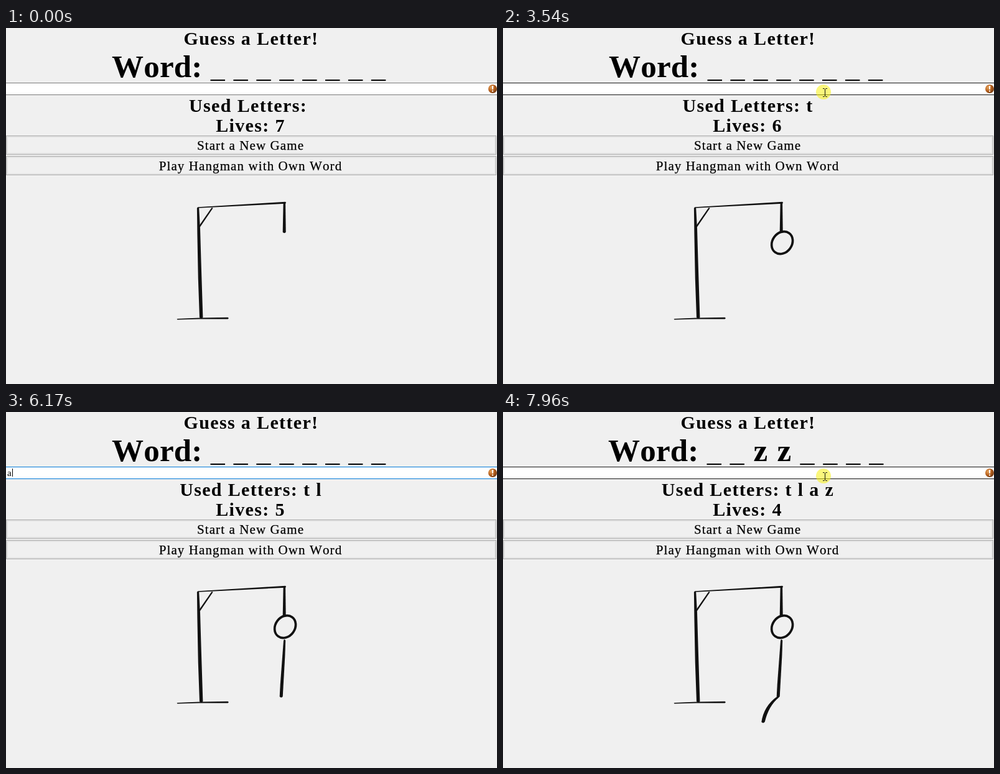
Recreate the animation shown at these times as an HTML page. Size 789 by 573 pixels, loop 8 s.

```html
<!DOCTYPE html>
<html lang="en">
<head>
<meta charset="utf-8">
<title>Hangman</title>
<style>
  html, body { margin: 0; width: 100%; height: 100%; overflow: hidden; background: #f0f0f0; }
  svg { display: block; }
  text {
    font-family: "Liberation Serif", serif;
    font-kerning: none;
    white-space: pre;
    text-anchor: middle;
  }
  .label { font-size: 30px; font-weight: bold; letter-spacing: 1.35px; }
  .word { font-size: 51px; font-weight: bold; letter-spacing: .2px; text-anchor: start; }
  .button { font-size: 21px; letter-spacing: 1.1px; stroke: #000; stroke-width: .25px; }
  .ink { fill: #111; }
</style>
</head>
<body>
<svg width="789" height="573" viewBox="0 0 789 573">
  <defs>
    <radialGradient id="amber" cx=".32" cy=".35" r=".75">
      <stop offset="0" stop-color="#e6a45c"/>
      <stop offset=".5" stop-color="#b9621f"/>
      <stop offset="1" stop-color="#6e3812"/>
    </radialGradient>
    <g id="frame">
      <rect x=".5" y=".5" width="787" height="30" fill="#f0f0f0" stroke="#adadad"/>
      <rect x="2" y="2" width="784" height="27" fill="none" stroke="#e1e1e1" stroke-width="2"/>
    </g>
  </defs>
  <rect width="789" height="573" fill="#f0f0f0"/>

  <text class="label" x="394" y="27">Guess a Letter!</text>
  <g id="word">
    <text class="word" x="170" y="79">Word:</text>
    <path id="blanks" stroke="#000" stroke-width="2"/>
    <g id="found"></g>
  </g>

  <rect y="88" width="789" height="20" fill="#fff"/>
  <rect id="top" y="88" width="789" height="1"/>
  <rect id="bottom" y="107" width="789" height="1"/>
  <text id="typed" x="2" y="103" style="font-size:15px;text-anchor:start"></text>
  <rect id="caret" y="91" width="1" height="13"/>
  <circle cx="782" cy="98" r="7" fill="url(#amber)"/>
  <path d="M780.7 93h2.6l-.5 6h-1.6zM781 100.5h2v2h-2z" fill="#fff"/>

  <text id="used" class="label" x="393.5" y="135"></text>
  <text id="lives" class="label" x="393" y="167"></text>

  <use href="#frame" y="173"/>
  <text class="button" x="393" y="196">Start a New Game</text>
  <use href="#frame" y="206"/>
  <text class="button" x="393" y="229">Play Hangman with Own Word</text>

  <path class="ink" d="M306.9 290q1.6-3.4 3.3 0l1.8 33 1.6 55 2.8 88q-2.5 2.4-5.4 0l-2.2-62-1.4-73z"/>
  <path class="ink" d="M309 288.3l140-8.5q2 1.2 0 2.9l-140 7z"/>
  <path class="ink" d="M330.2 289.6q2.4-.8 2 1l-20.4 30-2.6-.6z"/>
  <path class="ink" d="M445.6 282q1.9-1.6 3.5 0l.6 46.5q-2.4 3.2-5 0z"/>
  <path class="ink" d="M275.5 468.1l36-1.5 45-.9q2.5 1.4 0 2.8l-46 .1-35 .9q-1.8-.7 0-1.4z"/>

  <ellipse class="part" cx="448.6" cy="345.6" rx="15.7" ry="19.1" transform="rotate(36 448.6 345.6)"
    fill="none" stroke="#111" stroke-width="3.7"/>
  <path class="ink part" d="M446 368q1.6-4 3.2 0l-.8 24-3.7 66q-2.4 3-5 0l1-19z"/>
  <path class="ink part" d="M441 457.5q2.5-.2 2 2.2q-16 13-22.3 39q-2.5 3.3-5.4.4q3.7-26 25.7-41.6z"/>

  <circle id="click" cx="515" cy="103" r="12" fill="#f8f010" fill-opacity=".55"/>
  <path id="beam" fill="none" stroke="#111"
    d="M517.5 98v12M514 97.5h2.5M518.5 97.5h2.5M514 110.5h2.5M518.5 110.5h2.5"/>
  <path id="arrow" fill="#fff" stroke="#000" d="M.5.5v16l3.7-3.5 2.5 6 2.6-1.1-2.5-5.8h5z"/>
</svg>
<script>
const LOOP = 8000;
const $ = id => document.getElementById(id);
const GREY = "#7a7a7a", MID = "#484848", DARK = "#171717";
const NAVY = "#07446f", STEEL = "#0364ae", BLUE = "#0078d7";

const start = {
  border: GREY, letters: "", lives: 7, found: false,
  typed: "", caret: false, click: false, beam: false
};
const steps = [[0, {}]];
const add = (time, change) => steps.push([time, change]);

// Pressing on the entry: highlight, then the border fades to blue.
function press(times) {
  const tints = times.length > 3 ? [DARK, NAVY, STEEL, BLUE] : [DARK, STEEL, BLUE];
  times.forEach((time, i) => add(time, { border: tints[i], click: i < times.length - 1 }));
}

// Typing hides the pointer; the answer then redraws the entry under it.
function guess(time, hold, letter, result) {
  add(time, { caret: true, beam: false });
  add(time + 70, { typed: letter });
  add(time + hold, { ...result, typed: "", caret: false, beam: true, border: GREY });
  add(time + hold + 70, { border: MID });
  add(time + hold + 140, { border: DARK });
}

add(790, { border: MID, beam: true });
add(930, { border: DARK });
press([1130, 1200, 1270, 1340]);
guess(2800, 200, "t", { letters: "t", lives: 6 });
press([3540, 3610, 3680, 3750]);
guess(4350, 140, "l", { letters: "t l", lives: 5 });
press([4830, 4900, 4970]);
guess(6100, 150, "a", { letters: "t l a", lives: 4 });
press([6530, 6600, 6670, 6740]);
guess(7470, 210, "z", { letters: "t l a z", found: true });
add(7960, { click: true });

const show = (el, on) => { el.style.display = on ? "" : "none"; };
const parts = [...document.querySelectorAll(".part")];

function drawWord(found) {
  const slots = [...Array(8).keys()];
  const shift = i => found ? (i < 2 ? -1 : i > 3 ? 1.2 : 0) : 0;
  const left = i => 328.5 + i * 36.9 + shift(i);
  const hit = i => found && (i === 2 || i === 3);
  $("word").firstElementChild.setAttribute("x", found ? 169 : 170);
  $("blanks").setAttribute("d",
    slots.filter(i => !hit(i)).map(i => `M${left(i)} 84h23.5`).join(""));
  $("found").innerHTML = slots.filter(hit)
    .map(i => `<text class="word" x="${402.5 + (i - 2) * 38}" y="79">z</text>`).join("");
}

function drawState(s) {
  drawWord(s.found);
  $("top").setAttribute("fill", s.border);
  $("bottom").setAttribute("fill", s.border);
  $("used").textContent = "Used Letters: " + s.letters;
  $("lives").textContent = "Lives: " + s.lives;
  $("typed").textContent = s.typed;
  $("caret").setAttribute("x", s.typed ? 10 : 0);
  show($("caret"), s.caret);
  show($("click"), s.click);
  show($("beam"), s.beam);
  parts.forEach((part, i) => show(part, i < 7 - s.lives));
}

// The pointer rises from the lower edge, sampled at 70 ms.
function drawArrow(time) {
  const on = time >= 370 && time < 790;
  show($("arrow"), on);
  if (!on) return;
  const p = (Math.floor((time - 370) / 70) + 1) / 7;
  const ease = 1 - (1 - p) ** 2;
  $("arrow").setAttribute("transform",
    `translate(${Math.round(590 - 73 * ease)} ${Math.round(573 - 463 * ease)})`);
}

let shown = -1;
function tick() {
  const time = performance.now() % LOOP;
  const count = steps.filter(([at]) => at <= time).length;
  if (count !== shown) {
    drawState(Object.assign({}, start, ...steps.slice(0, count).map(step => step[1])));
    shown = count;
  }
  drawArrow(time);
  requestAnimationFrame(tick);
}
tick();
</script>
</body>
</html>
```
